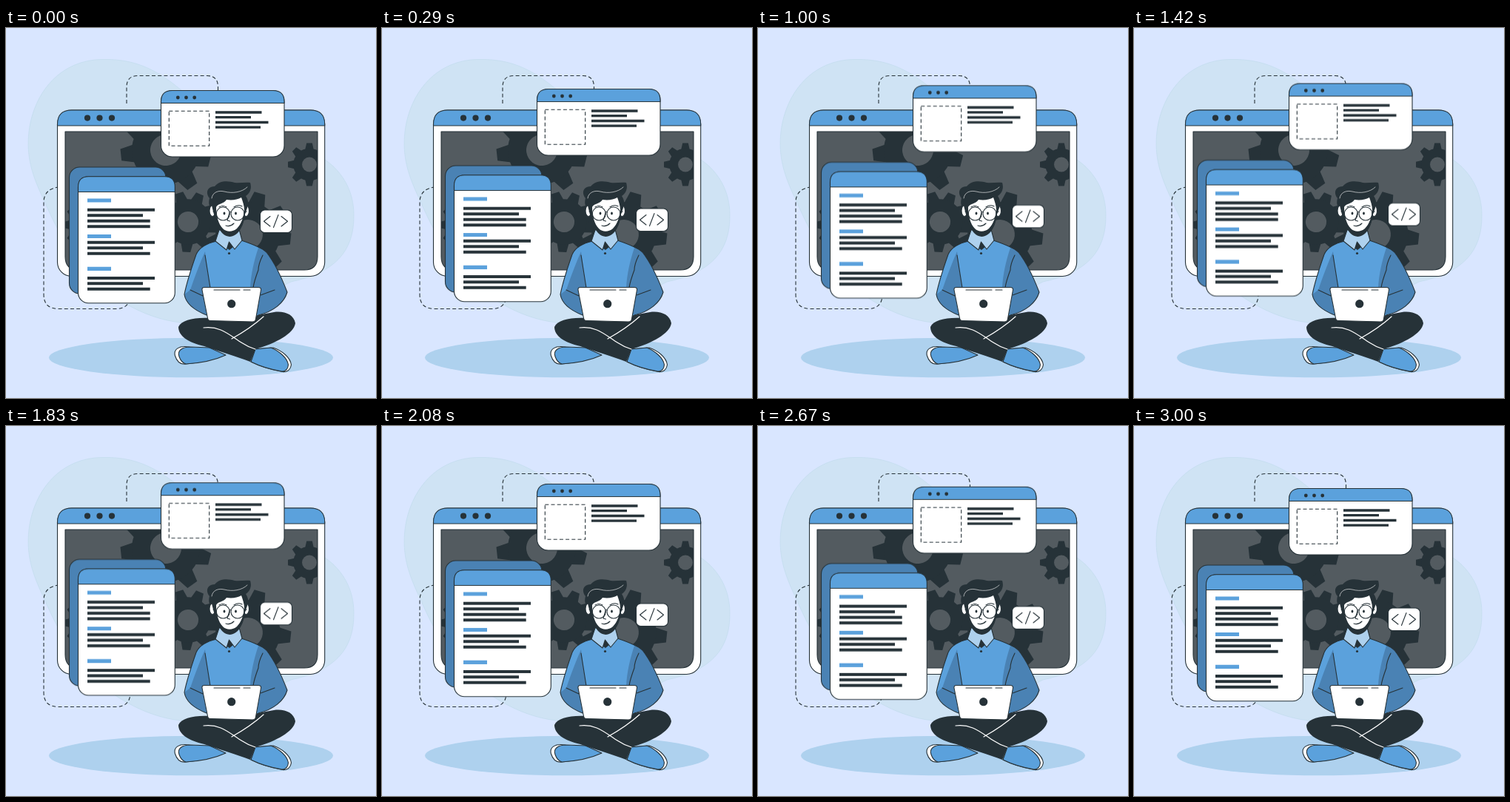
An HTML page without scripts that plays this animation: 500x500 px, repeating every 3.04 s.

```html
<!DOCTYPE html>
<html lang="en">
<head>
<meta charset="utf-8">
<title>Developer at work</title>
<style>
  html, body { margin: 0; width: 100%; height: 100%; overflow: hidden; background: #d9e6ff; }
  svg { display: block; width: 100%; height: 100%; }
  .ink { fill: #263238; }
  .blue { fill: #5ba1dc; }
  .shade { fill: #4a82b4; }
  .pale { fill: #aed1ee; }
  .white { fill: #fff; }
  .none { fill: none; }
  .line { stroke: #263238; stroke-width: 1.1; stroke-linejoin: round; stroke-linecap: round; }
  .dash { fill: none; stroke: #263238; stroke-width: 1.1; stroke-dasharray: 5 3.2; }
  .bars { fill: none; stroke: #263238; stroke-width: 3.9; }
  .thin { stroke-width: 3.3; }
  .tags { fill: none; stroke: #5ba1dc; stroke-width: 5.2; }
  .gleam { fill: none; stroke: #fff; stroke-width: 1.2; stroke-linecap: round; }
  .float { animation: float 3.04s linear infinite; }
  @keyframes float {
    0%, 98.7%, 100% { transform: none; }
    49.3% { transform: translateY(-10px); }
  }
</style>
</head>
<body>
<svg viewBox="0 0 500 500">
  <defs>
    <clipPath id="screen"><path d="M80 140H421V309Q421 327 403 327H98Q80 327 80 309Z"/></clipPath>
    <path id="tooth" d="M43-12L61-8V8L43 12Z"/>
    <g id="hub"><circle r="46" class="ink"/><circle r="21" fill="#535b60"/></g>
    <g id="three" class="ink">
      <use href="#tooth"/>
      <use href="#tooth" transform="rotate(40)"/>
      <use href="#tooth" transform="rotate(80)"/>
    </g>
    <g id="gear9">
      <use href="#three"/>
      <use href="#three" transform="rotate(120)"/>
      <use href="#three" transform="rotate(240)"/>
      <use href="#hub"/>
    </g>
    <g id="pair" class="ink">
      <use href="#tooth"/>
      <use href="#tooth" transform="rotate(180)"/>
    </g>
    <g id="gear8">
      <use href="#pair"/>
      <use href="#pair" transform="rotate(45)"/>
      <use href="#pair" transform="rotate(90)"/>
      <use href="#pair" transform="rotate(135)"/>
      <use href="#hub"/>
    </g>
  </defs>

  <!-- backdrop -->
  <rect width="500" height="500" fill="#d9e6ff"/>
  <path fill="#cfe3f4" stroke="#c2dcec" stroke-width=".7" d="M130 42.500C185 41 215 65 250 95C300 140 380 150 431 178C456 195 470 222 470 252C471 304 442 331 385 343C340 365 300 400 245 399C190 395 150 368 115 340C85 305 63 260 50 230C36 200 27 175 31 140C38 85 75 43 130 42.500Z"/>
  <ellipse class="pale" cx="250" cy="445.500" rx="192" ry="26.700"/>
  <path class="dash" d="M163 102V80Q163 64.500 178 64.500H272Q286.500 64.500 286.500 80V100"/>
  <path class="dash" d="M72 215Q51 217 51 236V360Q51 379.500 71 379.500H148Q168 379.500 168 360"/>

  <!-- monitor -->
  <rect class="white line" x="69.500" y="111" width="361.200" height="224.500" rx="19"/>
  <path class="blue line" d="M69.500 132V130Q69.500 111 88.500 111H411.700Q430.700 111 430.700 130V132Z"/>
  <g class="ink">
    <circle cx="110" cy="121.600" r="4.100"/>
    <circle cx="126.500" cy="121.600" r="4.100"/>
    <circle cx="143" cy="121.600" r="4.100"/>
  </g>
  <g clip-path="url(#screen)">
    <rect x="80" y="140" width="341" height="187" fill="#535b60"/>
    <use href="#gear9" transform="translate(216 165) rotate(14)"/>
    <use href="#gear9" transform="translate(327 279) rotate(6) scale(.95)"/>
    <use href="#gear9" transform="translate(246 262) rotate(13) scale(.67)"/>
    <use href="#gear8" transform="translate(410 184.500) scale(.475)"/>
    <use href="#gear8" transform="translate(106 266) scale(.48)"/>
  </g>
  <path class="none line" d="M80 140H421V309Q421 327 403 327H98Q80 327 80 309Z"/>

  <!-- floating panels -->
  <g class="float">
    <rect class="white line" x="209.500" y="84.500" width="166.500" height="89.500" rx="15"/>
    <path class="blue line" d="M209.500 101.500V99.500Q209.500 84.500 224.500 84.500H361Q376 84.500 376 99.500V101.500Z"/>
    <g class="ink">
      <circle cx="232.300" cy="94" r="2.400"/>
      <circle cx="243.500" cy="94" r="2.400"/>
      <circle cx="254.700" cy="94" r="2.400"/>
    </g>
    <rect class="dash" x="220.300" y="112.300" width="54.400" height="47"/>
    <path class="bars thin" d="M283 114H345.500M283 120.700H331M283 127.500H354.500M283 134.200H344"/>

    <rect class="shade line" x="85.500" y="188" width="130.500" height="171" rx="14"/>
    <rect class="white line" x="97.500" y="200.800" width="130.800" height="171" rx="14"/>
    <path class="blue line" d="M97.500 221.500V214.800Q97.500 200.800 111.500 200.800H214.300Q228.300 200.800 228.300 214.800V221.500Z"/>
    <path class="tags" d="M110 233H142M110 281.500H142M110 325.300H142"/>
    <path class="bars" d="M110 245.700H201M110 253.200H185M110 260.700H194.700M110 268.200H194.700M110 289.700H201M110 297.200H185M110 304.700H194.700M110 338H201M110 345.300H185M110 352.700H194.700"/>

    <rect class="white line" x="343.500" y="246" width="43" height="30.500" rx="6"/>
    <path class="none line" d="M357 254.500L348.500 261.300L357 268M368 252.500L361.500 269.500M372 254.500L380.500 261.300L372 268"/>
  </g>

  <!-- sweater -->
  <path class="blue" d="M285 288C271 291 261 297 257 306C250 326 244 345 241 360C243 373 256 382 271 388L276 394H335L341 388C362 383 376 371 380 357C372 336 362 316 352 303C344 296 330 291 318 287L302 300Z"/>
  <path class="shade" d="M269 302C262 318 255 336 249 354L241 360C243 373 256 382 271 388L267 362L276 351C273 333 271 319 269 302Z"/>
  <path class="shade" d="M341 297C335 315 331 333 330 351H344L338 388C362 383 376 371 380 357C372 336 362 316 352 303Z"/>
  <path class="none line" d="M285 288C271 291 261 297 257 306C250 326 244 345 241 360C243 373 256 382 271 388M318 287C330 291 344 296 352 303C362 316 372 336 380 357C376 371 362 383 341 388M269 307C271 319 273 333 276 351M249 354L266 362M347 307C344 313 341 320 341 327C338 335 335 344 334 351M363 354L344 361"/>
  <path class="pale line" d="M288 273L283 288L298 300L301.500 289L309 299L319 287L315 272Z"/>
  <circle class="ink" cx="301.500" cy="304.500" r="1.600"/>

  <!-- head -->
  <ellipse class="white line" cx="279" cy="247" rx="4" ry="7.500"/>
  <ellipse class="white line" cx="324.500" cy="247" rx="4" ry="7.500"/>
  <path class="ink" d="M281 252C283 262 286 270 292 277C299 284 307 283 313 277C319 271 322 261 323 252L327 240C328 234 326 230 324 227C331 222 332 215 330 209C323 208 316 210 309 209C300 206 288 206 282 214C272 214 269 223 275 230C273 237 275 244 278 240Z"/>
  <path class="white" d="M284 242C286 237 294 238 298 232C306 233 313 232 318 229C320 235 322 240 322 246C321 256 318 265 312 271C306 276 298 276 293 271C287 265 284 254 284 242Z"/>
  <path class="gleam" style="stroke-width:.6" d="M278 230C279 222 287 219 295 221C306 224 319 222 326 215"/>
  <g class="none line">
    <circle cx="293.300" cy="251" r="9"/>
    <circle cx="313" cy="251" r="9"/>
    <path d="M302 249Q303 247.500 304.200 249M280 248L284.300 250M322 250L325 248M288 242Q293 239 298 242M308 242Q314 238 319 241M302 250L299 260L302.500 261M297 267Q303 269 308 264"/>
  </g>
  <ellipse class="ink" cx="295" cy="250.500" rx="1.400" ry="2.100"/>
  <ellipse class="ink" cx="310.500" cy="250.500" rx="1.400" ry="2.100"/>

  <!-- legs and shoes -->
  <path class="white line" d="M247 431C234 429 226 434 228.500 443C231 451 236 455 243 454C260 452 281 449 294 442Z"/>
  <path class="blue line" d="M249 431C238 431 231 436 234 444C236 450 240 453 243 454C260 453 282 449 297 442L275 432Z"/>
  <path class="white line" d="M337 434L361 432C373 436 384 445 385.500 455C384 463 379 466 371 464C355 461 341 456 331 451Z"/>
  <path class="blue line" d="M337 434L358 432C370 437 380 446 381.500 455C381 461 378 464 373 464C355 461 341 456 331 451Z"/>
  <path class="ink" d="M274 392C254 391 237 395 233 404C233 416 246 425 268 430C286 436 314 445 330 451L337 434C365 426 389 413 391 399C389 387 376 382 362 384L335 389Z"/>
  <path class="gleam" d="M267 405C289 402 302 415 318 425Q327 431 337 434M348 390C338 399 321 411 305 420"/>

  <!-- laptop -->
  <path class="white line" d="M268 350.500H341Q345 350.500 344.500 354L337.500 393Q337 397 333 397L276 395.500Q273 395.500 272.500 392L265 354Q264.500 350.500 268 350.500Z"/>
  <path class="none line" d="M281 354H316M321 354H330"/>
  <circle class="ink" cx="304.700" cy="372.700" r="5.600"/>
</svg>
</body>
</html>
```
